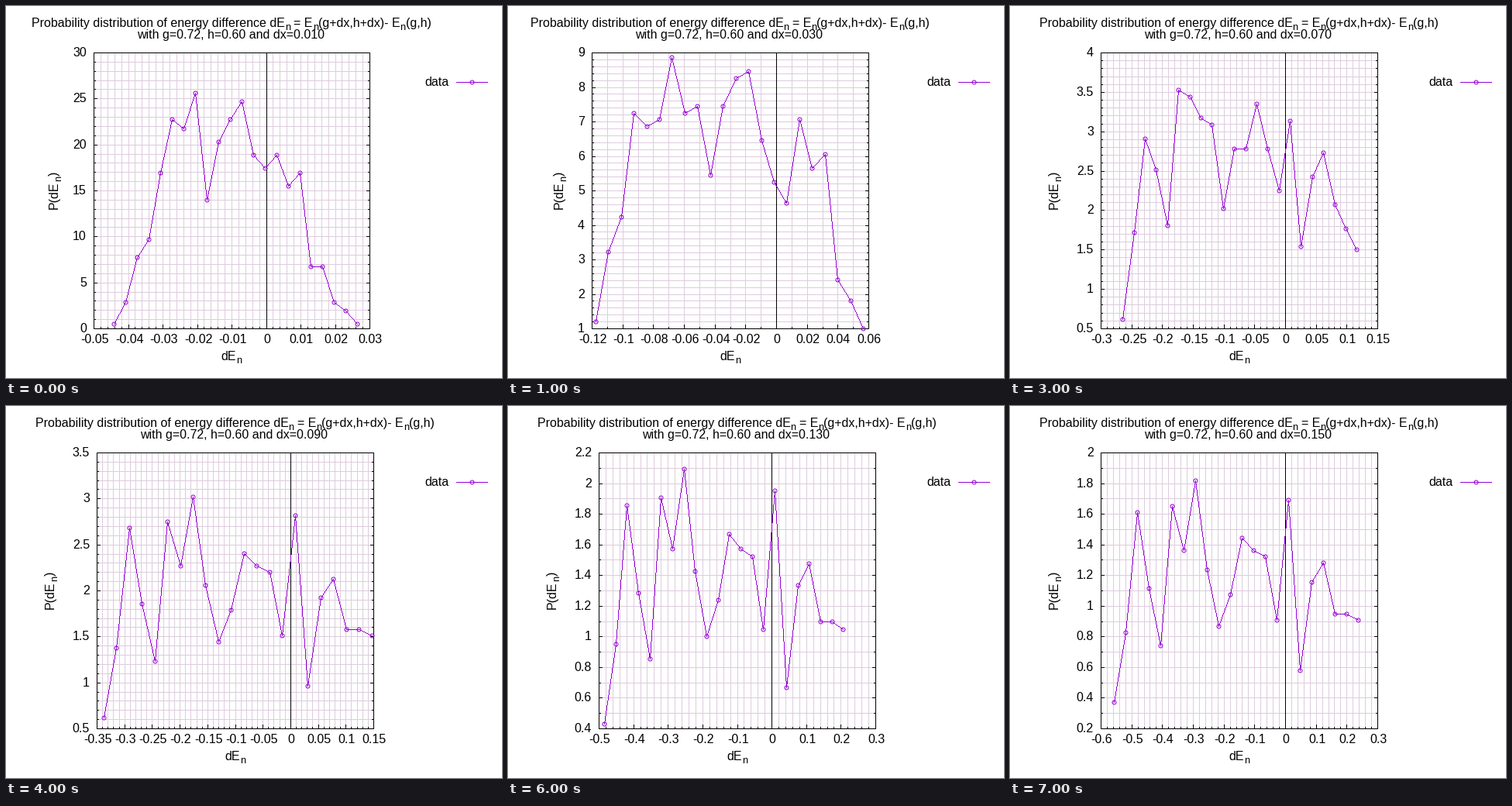
Write a matplotlib script that moves like this. It is 640 px wide and 480 px high and loops after 8 s.

```python
import matplotlib.pyplot as plt
import numpy as np
from matplotlib.animation import FuncAnimation

plt.rcParams["font.family"] = "Liberation Sans"
plt.rcParams["path.simplify"] = False

W, H, DPI = 640, 480, 80
PT = 72 / DPI                 # points per pixel
TOP, BOTTOM = 60, 416
EM = 16                       # font size in pixels
SUB = 0.8 * EM
VIOLET, GRID = "#9400d3", "#ddccdd"
FRAMES = 8

# Key histograms at steps (100 * dx) that the others are blended from
KEYS = (1, 3, 5, 9)
PROFILES = (
    (1, 6, 16, 20, 35, 47, 45, 53, 29, 42, 47,
     51, 39, 36, 39, 32, 35, 14, 14, 6, 4, 1),
    (6, 16, 21, 36, 34, 35, 44, 36, 37, 27, 37,
     41, 42, 32, 26, 23, 35, 28, 30, 12, 9, 5),
    (5, 19, 27, 30, 23, 40, 45, 28, 40, 25, 37,
     28, 43, 31, 29, 30, 21, 27, 31, 24, 17, 12),
    (9, 20, 39, 27, 18, 40, 33, 44, 30, 21, 26,
     35, 33, 32, 22, 41, 14, 28, 31, 23, 23, 22),
)

# Text runs with their advance; None marks the subscript n
SUB_ADVANCE = 7.1
TITLE = [("Probability distribution of energy difference dE", 326.4), None,
         (" = E", 28.9), None, ("(g+dx,h+dx)- E", 105.8), None, ("(g,h)", 32.9)]
X_NAME = [("dE", 19.6), None]
Y_NAME = [("P(dE", 35.6), None, (")", 5.3)]

fig = plt.figure(figsize=(W / DPI, H / DPI), dpi=DPI, facecolor="white")
ax = fig.add_axes([0, 0, 1, 1])
ax.set_xlim(0, W)
ax.set_ylim(H, 0)
ax.axis("off")


def stroke(x, y, color, z, smooth=False):
    ax.plot(x, y, color=color, lw=PT, aa=smooth, snap=False, zorder=z,
            solid_capstyle="butt")


def segments(segs, color, z):
    """Draw many (x0, y0, x1, y1) pieces as one broken line."""
    x, y = [], []
    for x0, y0, x1, y1 in segs:
        x += [x0, x1, np.nan]
        y += [y0, y1, np.nan]
    stroke(x, y, color, z)


def crisp_line(px, py):
    """Join pixels with one-pixel stairs, without smoothing."""
    dots = []
    for x0, y0, x1, y1 in zip(px, py, px[1:], py[1:]):
        n = int(max(abs(x1 - x0), abs(y1 - y0))) + 1
        xs = np.floor(np.linspace(x0, x1, n) + 0.5)
        ys = np.floor(np.linspace(y0, y1, n) + 0.5) + 0.5
        dots += [(x, y, x + 1, y) for x, y in zip(xs, ys)]
    segments(dots, VIOLET, 5)


def circles(px, py):
    a = np.append(np.linspace(0, 2 * np.pi, 33), np.nan)
    x = np.asarray(px)[:, None] + 0.5 + 2.5 * np.cos(a)
    y = np.asarray(py)[:, None] + 0.5 + 2.5 * np.sin(a)
    stroke(x.ravel(), y.ravel(), VIOLET, 6, smooth=True)


def label(x, y, s, size=EM, angle=0):
    ax.text(x, y, s, fontsize=size * PT, color="black", ha="left",
            va="baseline", rotation=angle, rotation_mode="anchor", zorder=9)


def number_width(s):
    return EM * sum({".": 0.278, "-": 0.333}.get(c, 0.556) for c in s)


def runs(cx, cy, parts, upright=False):
    """Centre a row of text runs with subscripts on a point."""
    pos = -sum(p[1] if p else SUB_ADVANCE for p in parts) / 2
    for part in parts:
        s, adv = part or ("n", SUB_ADVANCE)
        size, drop = (EM, 0) if part else (SUB, 4)
        lead = 0.278 * EM if s[0] == " " else 0
        if upright:
            label(cx + drop, cy - pos - lead, s.strip(), size, 90)
        else:
            label(cx + pos + lead, cy + drop, s.strip(), size)
        pos += adv


class Axis:
    """Range rounded out to whole ticks, mapped onto pixels."""

    def __init__(self, values):
        lo, hi = min(values), max(values)
        power = 10 ** np.floor(np.log10(hi - lo))
        density = 20 * power / (hi - lo)
        unit = 0.2 if density > 10 else 0.5 if density > 4 else 1
        self.step = unit * power
        self.parts = 2 if unit == 0.2 else 5
        self.first = int(np.floor(lo / self.step + 1e-9))
        self.last = int(np.ceil(hi / self.step - 1e-9))
        self.names = [f"{round(k * self.step, 6):g}"
                      for k in range(self.first, self.last + 1)]

    def place(self, start, end):
        self.start, self.end = start, end

    def __call__(self, v):
        t = (v / self.step - self.first) / (self.last - self.first)
        return np.floor(self.start + t * (self.end - self.start) + 0.5)

    def ticks(self):
        """Yield pixel and name; minor ticks have no name."""
        for k in range((self.last - self.first) * self.parts + 1):
            major, minor = divmod(k, self.parts)
            yield (self((self.first + k / self.parts) * self.step),
                   None if minor else self.names[major])


def histogram(d):
    """Bin centres and densities for a step of d hundredths."""
    counts = np.array([np.interp(d, KEYS, col) for col in zip(*PROFILES)])
    centres = np.linspace(-0.0075 - 0.0367 * d, 0.0115 + 0.015 * d, len(counts))
    return centres, counts * 0.62 * (1 - 0.22 / d ** 2) / d


def plot_box(left, right, x_axis, y_axis):
    grid, marks = [], []
    for x, name in x_axis.ticks():
        grid.append((x + 0.5, TOP, x + 0.5, BOTTOM + 1))
        marks.append((x + 0.5, BOTTOM - (5 if name else 2), x + 0.5, BOTTOM + 1))
        if name:
            label(x + 1.3 - number_width(name) / 2, 435, name)
    for y, name in y_axis.ticks():
        y, n = y + 0.5, 5 if name else 3
        grid.append((left, y, right + 1, y))
        marks += [(left, y, left + n, y), (right + 1 - n, y, right + 1, y)]
        if name:
            label(left - 9 - number_width(name), y + 4.5, name)
    for x in (left, right, x_axis(0)):
        marks.append((x + 0.5, TOP, x + 0.5, BOTTOM + 1))
    for y in (TOP, BOTTOM):
        marks.append((left, y + 0.5, right + 1, y + 0.5))
    segments(grid, GRID, 1)
    segments(marks, "black", 3)


def draw(i):
    for artist in list(ax.lines) + list(ax.texts):
        artist.remove()
    d = 2 * i + 1
    xs, ys = histogram(d)
    x_axis, y_axis = Axis(xs), Axis(ys)

    # Wider tick labels push the square plot to the right
    chars = max(map(len, y_axis.names))
    left, right = round(103.7 + 4.5 * chars), round(460.3 + 4.5 * chars)
    mid = (left + right) / 2
    x_axis.place(left, right)
    y_axis.place(BOTTOM, TOP)
    plot_box(left, right, x_axis, y_axis)

    px, py = x_axis(xs), y_axis(ys)
    crisp_line(px, py)
    circles(px, py)

    runs(mid, 27, TITLE)
    label(mid - 122, 42, f"with g=0.72, h=0.60 and dx={d / 100:.3f}")
    runs(mid, 457, X_NAME)
    runs(left - 28 - 9 * chars, 238, Y_NAME, upright=True)

    label(540.6, 103, "data")
    crisp_line([581, 621], [98, 98])
    circles([601], [98])
    return ax.lines


anim = FuncAnimation(fig, draw, frames=FRAMES, interval=1000,
                     init_func=lambda: draw(0), repeat=True, blit=False)
plt.show()
```
